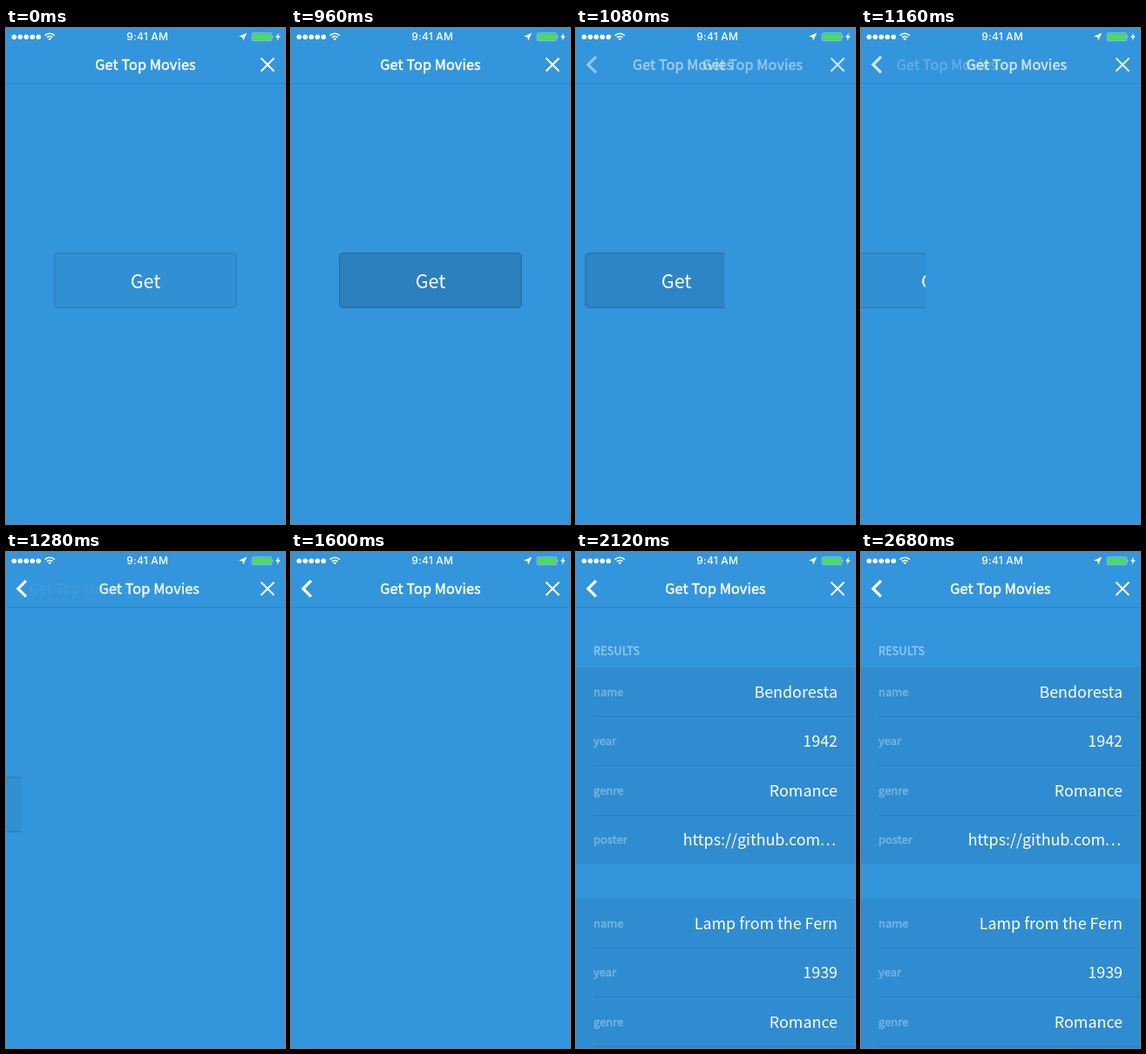
Animation of 320 by 568 pixels, one loop 3040 ms. Source, as an HTML page:

```html
<!DOCTYPE html>
<html lang="en">
<head>
<meta charset="utf-8">
<title>Get Top Movies</title>
<style>
  html, body { margin: 0; width: 100%; height: 100%; overflow: hidden; background: #3395dc; }
  svg { display: block; width: 100vw; height: 100vh; }
  text { font-family: "Noto Sans CJK SC", "Noto Sans CJK JP", "Noto Sans CJK", "Open Sans", sans-serif; fill: #fff; }
  .semi { stroke: #fff; stroke-width: .45px; }
  .title { font-size: 16.2px; letter-spacing: .1px; text-anchor: middle; }
  .label { font-size: 13px; opacity: .34; }
  .head { font-size: 12.5px; letter-spacing: .28px; opacity: .48; }
  .value { font-size: 17.9px; text-anchor: end; }
  .dots { letter-spacing: 1.67px; }
  .time { font: 500 12px Inter, sans-serif; letter-spacing: .2px; text-anchor: middle; }
  .icon { fill: none; stroke: #fff; }
</style>
</head>
<body>
<svg viewBox="0 0 320 568">
  <defs>
    <path id="close" class="icon" stroke-width="2" d="M292.5 34.5l15 15m0-15l-15 15"/>
  </defs>

  <g id="oldView">
    <rect id="button" x="56" y="258" width="208" height="62" rx="4" stroke-width="2"/>
    <text x="160" y="298" font-size="21.5" text-anchor="middle">Get</text>
  </g>
  <g id="newView">
    <rect width="320" height="568" fill="#3395dc"/>
    <g id="results">
      <text class="head semi" x="20" y="118">RESULTS</text>
    </g>
  </g>

  <rect width="320" height="64" fill="#3395dc"/>
  <rect y="63" width="320" height="1" fill="#2c86c8"/>
  <g id="oldBar">
    <text id="oldTitle" class="title semi" x="160" y="48">Get Top Movies</text>
    <use href="#close"/>
  </g>
  <g id="newBar">
    <text id="newTitle" class="title semi" x="160" y="48">Get Top Movies</text>
    <use href="#close"/>
    <path class="icon" stroke-width="3.2" d="M23 32.8L13.8 42l9.2 9.2"/>
  </g>

  <g id="status" fill="#fff">
    <g class="icon" stroke-width="1.6">
      <path d="M44.6 8.6a8 8 0 0 1 11.2 0M46.9 10.9a4.8 4.8 0 0 1 6.6 0"/>
    </g>
    <path d="M50.2 14.3l-1.9-2a2.8 2.8 0 0 1 3.8 0z"/>
    <text class="time" x="162.2" y="14">9:41 AM</text>
    <path d="M276.3 5.6l-4.2 9-.8-4.2-4.3-.7z"/>
    <rect x="282.2" y="5.7" width="22.6" height="9" rx="1.6" fill="none" stroke="#fff" stroke-width=".6" opacity=".7"/>
    <rect x="283" y="6.5" width="21" height="7.4" rx="1" fill="#4cd964"/>
    <path d="M305.7 8.4q1.3 1.8 0 3.6z"/>
    <path d="M313 5.5l-4 5.3h2.6l-1 4 4.2-5.5h-2.6z"/>
  </g>
</svg>
<script>
const LOOP = 3040, STEP = 40;
const PRESS = 960, PUSH = 977, PUSH_END = 1480, LOADED = 1640;
const RATE = 0.0153;

const $ = id => document.getElementById(id);

function add(parent, tag, attrs, text = '') {
  const el = document.createElementNS('http://www.w3.org/2000/svg', tag);
  for (const key in attrs) el.setAttribute(key, attrs[key]);
  el.textContent = text;
  parent.append(el);
  return el;
}

function addGroup(top, rows) {
  const height = 56.4, results = $('results');
  add(results, 'rect', { y: top, width: 320, height: Math.floor(height * 4), fill: '#308cd0' });
  rows.forEach(([label, value, cut], i) => {
    const y = top + i * height;
    add(results, 'text', { class: 'label semi', x: 20, y: y + 33 }, label);
    const text = add(results, 'text', { class: 'value', x: 300, y: y + 35 }, value);
    if (cut) add(text, 'tspan', { class: 'dots' }, '...');
    if (i < 3) add(results, 'rect', { x: 20, y: Math.floor(y + height), width: 300, height: 1, fill: '#2a7fbf' });
  });
}

addGroup(132, [['name', 'Bendoresta'], ['year', '1942'], ['genre', 'Romance'], ['poster', 'https://github.com', true]]);
addGroup(397, [['name', 'Lamp from the Fern'], ['year', '1939'], ['genre', 'Romance'], ['poster', '']]);

for (let i = 0; i < 5; i++) add($('status'), 'circle', { cx: 9.3 + i * 7, cy: 10.2, r: 2.8 });

const clamp = v => Math.max(0, Math.min(1, v));
const mix = (a, b, k) => `rgb(${a.map((v, i) => Math.round(v + (b[i] - v) * k))})`;
const shift = (id, x) => $(id).setAttribute('transform', `translate(${x} 0)`);

// Critically damped spring
function pushAt(t) {
  if (t < PUSH) return 0;
  if (t >= PUSH_END) return 1;
  const x = (t - PUSH) * RATE;
  return 1 - (1 + x) * Math.exp(-x);
}

function draw(t) {
  const p = pushAt(t);
  const pressed = t < PRESS ? 0 : clamp((1160 - t) / 120);
  $('button').setAttribute('fill', mix([49, 143, 212], [44, 128, 189], pressed));
  $('button').setAttribute('stroke', mix([43, 133, 198], [40, 117, 174], pressed));
  shift('oldView', -96 * p);
  shift('newView', 320 * (1 - p));
  shift('oldTitle', -80 * p);
  shift('newTitle', 80 * (1 - p));
  $('oldBar').setAttribute('opacity', 1 - p);
  $('newBar').setAttribute('opacity', p);
  $('results').setAttribute('visibility', t >= LOADED ? 'visible' : 'hidden');
}

const start = performance.now();
function frame() {
  const t = (performance.now() - start) % LOOP;
  draw(Math.floor(t / STEP) * STEP);
  requestAnimationFrame(frame);
}
frame();
</script>
</body>
</html>
```
